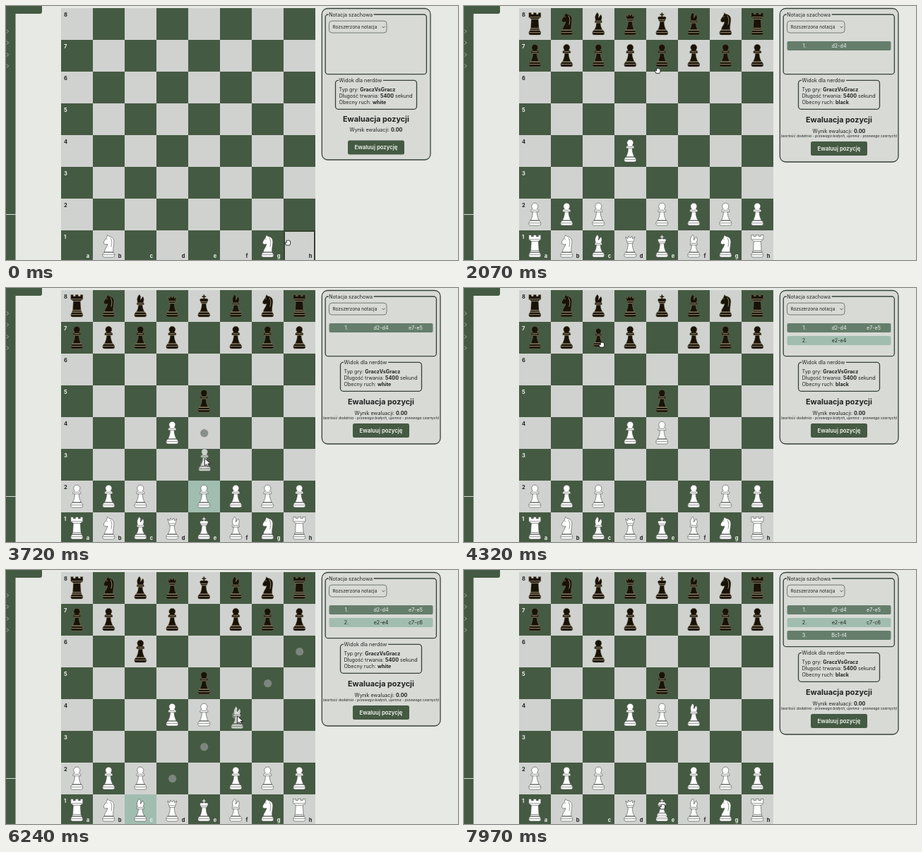
An HTML page for the animation above (7990 ms loop, 640 by 360 pixels).

```html
<!DOCTYPE html>
<html lang="pl">
<head>
<meta charset="utf-8">
<title>Szachy</title>
<style>
  html, body { margin: 0; width: 100%; height: 100%; overflow: hidden; background: #e7e9e5; }
  svg { display: block; width: 100%; height: 100%; }
  text { font: 7.15px Inter, sans-serif; fill: #1f2420; white-space: pre; }
  .bold { font-weight: 700; }
  .mid { text-anchor: middle; }
  .small { font-size: 6.4px; }
  .title { font-size: 10.8px; }
  .note { font-size: 5px; font-style: italic; }
  .button { font-size: 7.8px; font-weight: 600; fill: #f4f6f3; }
  .light { fill: #f0f3ef; }
  .coord { font-size: 7.5px; font-weight: 700; }
  .frame { fill: none; stroke: #36433a; stroke-width: 1.3; }
  .white { fill: #fff; stroke: #454b46; stroke-width: .6; }
  .black { fill: #191207; stroke: #8e8063; stroke-width: .4; }
  .detail { fill: none; }
  .black .detail { stroke: #cbbf9f; stroke-width: .7; }
  .cursor { fill: #fff; stroke: #1a1a1a; stroke-width: .9; stroke-linejoin: round; }
</style>
</head>
<body>
<svg viewBox="0 0 640 360">
  <g id="page"></g>
  <g id="scene"></g>
</svg>
<script>
const LOOP = 7990, LOADED = 100, CELL = 45, LEFT = 78, TOP = 3;
const GREEN = '#455a42', PALE = '#d0d2cf', TEAL = '#a1bdb0', PANEL = '#d8dad6';
const FILES = 'abcdefgh';

// each piece: silhouette above the shared base, then inner lines
const BASE = 'M16 31h13l2 3v1.5q0 2.5-2.5 2.5h-12q-2.5 0-2.5-2.5v-1.5z';
const BASE_LINES = 'M16 31.2h13M14.500 34.600h16';
const SHAPES = {
  p: ['M19.5 14.3a4.6 4.6 0 1 1 6 0l2.5 2v2.4h-2.6c0 4.5.8 7.5 3.1 12.3h-12c2.3-4.8 3.1-7.8 3.1-12.3H17v-2.4z',
      'M18.5 16.4h8M19.5 18.8h6'],
  r: ['M14 6.5h3.5v2.3h3V6.5h4v2.3h3V6.5H31V13l-3.500 2.500.8 13 1.200 2.500h-14l1.200-2.500.8-13L14 13z',
      'M15 12.800h15M17.500 15.600h10M17 28.500h11'],
  n: ['M21 6.5l2 2c5 .5 7.5 4 7 9-.3 4-1.5 8-1 13.5H16.5c0-4.500 4-7 4.500-11.500l-3 .5-2.500-1.500.5-3 3.500-5z',
      'M19.500 12.300h1.500M25 10.500c2.500 4 2.500 8 1 13'],
  b: ['M21 6c-3 3.5-4 7-2.5 11l-1 1.5v2.2h2c0 4-.8 7-3 10.3h12c-2.2-3.3-3-6.3-3-10.3h2v-2.2l-1-1.5c1.5-3 1-6-.5-8l-3.5 5 .5-5z',
      'M18.500 18.400h8M19 20.800h7'],
  q: ['M16 9l3 3 1-4 2.5 3 2.5-3 1 4 3-3-2.5 9h-1c0 5 .8 9 3 13h-12c2.2-4 3-8 3-13h-1z',
      'M18.500 15.800h8M19.500 18.600h6'],
  k: ['M21.7 6.5h1.6v2h2v1.6h-2v2H27l1.5 1.5-2 5h-1c0 5 .8 9 3 12.4h-12c2.2-3.4 3-7.4 3-12.4h-1l-2-5 1.5-1.5h3.7v-2h-2V8.5h2z',
      'M18.500 16.400h8M19.500 18.800h6'],
};

// press: piece shrinks; drag: targets shown; drop: piece lands
const MOVES = [
  { from: 'd2', to: 'd4', dots: 'd3 d4', press: 850, drag: 920, drop: 1460, ghost: false },
  { from: 'e7', to: 'e5', dots: 'e6 e5', press: 2250, drag: 2350, drop: 2960, ghost: true },
  { from: 'e2', to: 'e4', dots: 'e3 e4', press: 3400, drag: 3480, drop: 3960, ghost: true },
  { from: 'c7', to: 'c6', dots: 'c6 c5', press: 4290, drag: 4400, drop: 4920, ghost: true },
  { from: 'c1', to: 'f4', dots: 'd2 e3 f4 g5 h6', press: 5490, drag: 5610, drop: 6500, ghost: true, name: 'B' },
];
const POINTER = [
  [0, 399, 335], [200, 399, 335], [800, 237, 298], [920, 237, 296], [1180, 231.5, 235],
  [1420, 235, 205], [1600, 235, 205], [2220, 281, 72], [2350, 281, 72], [2900, 280, 163],
  [3030, 280, 163], [3380, 282, 297], [3480, 282, 297], [3900, 281, 206], [4020, 281, 206],
  [4280, 195, 80], [4400, 195, 80], [4860, 191, 117], [5000, 191, 117], [5450, 190, 333],
  [5600, 190, 333], [6240, 327.5, 207], [6420, 327, 206], [6850, 327, 206], [7900, 281, 335], [LOOP, 281, 335],
];

const rect = (x, y, w, h, attrs) => `<rect x="${x}" y="${y}" width="${w}" height="${h}" ${attrs}/>`;
const label = (x, y, text, cls = '') => `<text x="${x}" y="${y}" class="${cls}">${text}</text>`;
const bold = text => `<tspan class="bold">${text}</tspan>`;
const place = square => [LEFT + FILES.indexOf(square[0]) * CELL, TOP + (8 - square[1]) * CELL];

function piece([color, kind], x, y, scale = 1, opacity = 1) {
  const [body, lines] = SHAPES[kind];
  const cls = color === 'w' ? 'white' : 'black';
  return `<g class="${cls}" opacity="${opacity}" transform="translate(${x + 22.3} ${y + 22.5}) scale(${scale}) translate(-22.5 -22.5)">
    <path d="${body}"/><path d="${BASE}"/><path class="detail" d="${lines}${BASE_LINES}"/></g>`;
}

function drawPage() {
  let out = rect(0, 0, 13.5, 360, `fill="${GREEN}"`) +
    `<path d="M0 0H51V8q0 3-3 3H0z" fill="${GREEN}"/>` +
    rect(0, 295, 14, 1, 'fill="#d8ddd6"');
  for (const y of [36, 52, 69, 85])
    out += `<path d="M1 ${y - 2.5}l2.5 2.5-2.5 2.5" fill="none" stroke="#c5cec3" stroke-width=".8"/>`;
  for (let row = 0; row < 8; row++)
    for (let col = 0; col < 8; col++)
      out += rect(LEFT + col * CELL, TOP + row * CELL, CELL, CELL,
        `fill="${(row + col) % 2 ? GREEN : PALE}" shape-rendering="crispEdges"`);
  return out;
}

function drawCoords() {
  let out = '';
  for (let i = 0; i < 8; i++) {
    out += label(82, 14.7 + i * CELL, 8 - i, 'coord ' + (i % 2 ? 'light' : ''));
    out += label(LEFT + i * CELL + 38, 357.3, FILES[i], 'mid coord ' + (i % 2 ? '' : 'light'));
  }
  return out;
}

function startBoard(loaded) {
  const board = {};
  [...FILES].forEach((file, i) => {
    const kind = 'rnbqkbnr'[i];
    if (loaded || kind === 'n') board[file + 1] = 'w' + kind;
    if (!loaded) return;
    board[file + 2] = 'wp';
    board[file + 7] = 'bp';
    board[file + 8] = 'b' + kind;
  });
  return board;
}

function pointerAt(t) {
  const i = Math.max(1, POINTER.findIndex(p => p[0] > t));
  const [t0, x0, y0] = POINTER[i - 1], [t1, x1, y1] = POINTER[i];
  const u = (t - t0) / (t1 - t0), e = u * u * (3 - 2 * u);
  return [x0 + (x1 - x0) * e, y0 + (y1 - y0) * e];
}

function drawBoard(t) {
  const board = startBoard(t >= LOADED);
  const [px, py] = pointerAt(t);
  let under = '', pieces = '', over = '', active = null, dragging = false;
  for (const move of MOVES) {
    if (t >= move.drop) {
      board[move.to] = board[move.from];
      delete board[move.from];
    } else if (t >= move.press) {
      active = move;
      dragging = t >= move.drag;
    }
  }
  const snap = (value, origin) => origin + Math.floor((value - origin) / CELL) * CELL;
  const hx = snap(px, LEFT), hy = snap(py, TOP);
  const landed = MOVES.some(m => t >= m.drop && t < m.drop + 90);
  if (dragging) {
    const [x, y] = place(active.from);
    if (!active.ghost)
      under += rect(hx + 1, hy + 1, 43, 43, 'fill="none" stroke="#b3c5ba" stroke-width="2"');
    under += rect(x, y, CELL, CELL, `fill="${TEAL}"`);
    for (const square of active.dots.split(' ')) {
      const [dx, dy] = place(square);
      over += `<circle cx="${dx + 22.7}" cy="${dy + 22.7}" r="5.6" fill="#828a83" fill-opacity=".92"/>`;
    }
    if (active.ghost) over += piece(board[active.from], px - 22.5, py - 20, 1, .7);
  } else if (landed || t < 250) {
    under += rect(hx + 1, hy + 1, 43, 43, 'fill="none" stroke="#34432f" stroke-width="2"');
  }
  for (const square in board) {
    const pressed = active && !dragging && active.from === square;
    pieces += piece(board[square], ...place(square), pressed ? .82 : 1);
  }
  if (t >= 7900) pieces += piece('wk', 258, 315, .82);
  const cursor = dragging
    ? 'M0 0v10.5l2.6-2.2 1.6 3 1.8-.9-1.5-2.900h3.800z'
    : 'M-2.5 4l-1.5-3.5 1.2-.7 1 1v-3.300q.8-.8 1.4 0 .7-1 1.4 0 .8-.6 1.4.3 1-.3 1.2.7V2l-1 2z';
  return under + pieces + drawCoords() + over +
    `<path class="cursor" transform="translate(${px} ${py})" d="${cursor}"/>`;
}

function fieldset(x, y, w, h, title, titleWidth) {
  return rect(x, y, w, h, 'rx="4" class="frame"') +
    rect(x + 4.5, y - 2, titleWidth + 1, 4, `fill="${PANEL}"`) + label(x + 5, y + 2.8, title);
}

function drawPanel(t) {
  const wide = t >= LOADED;
  const done = MOVES.filter(m => t >= m.drop);
  const grow = done.length > 4 ? 12 : 0;
  const width = wide ? 168 : 154, center = 447 + width / 2, low = wide ? 1.5 : 0;
  const infoX = center - 58, infoY = 105 + grow;
  let out = rect(447.3, 3.5, width - .3, (wide ? 217.5 : 214.5) + grow, `rx="8" class="frame" style="fill:${PANEL}"`) +
    fieldset(452.2, 12, width - 10.8, 84.7 + grow, 'Notacja szachowa', 63) +
    rect(457.5, 21.2, 81.5, 16.8, `rx="4" fill="${PANEL}" stroke="#59645c" stroke-width=".8"`) +
    label(462.5, 32, 'Rozszerzona notacja', 'small') +
    '<path d="M532.5 28.8l2 2 2-2" fill="none" stroke="#333" stroke-width=".8"/>';
  for (let i = 0; i < done.length; i += 2) {
    const y = 50 + i * 9, dark = i % 4 === 0, cls = dark ? 'mid light' : 'mid';
    out += rect(457.5, y, 147, 13, `rx="2" fill="${dark ? '#657e6c' : TEAL}"`) +
      label(482, y + 9.1, `${i / 2 + 1}.`, cls);
    done.slice(i, i + 2).forEach((m, j) => {
      out += label(531 + j * 49, y + 9.1, `${m.name || ''}${m.from}-${m.to}`, cls);
    });
  }
  out += fieldset(infoX + .5, infoY + .3, 115, 41, 'Widok dla nerdów', 62) +
    label(infoX + 5.5, infoY + 16.3, 'Typ gry: ' + bold('GraczVsGracz')) +
    label(infoX + 5.5, infoY + 25.3, `Długość trwania: ${bold('5400')} sekund`) +
    label(infoX + 5.5, infoY + 34.3, 'Obecny ruch: ' + bold(done.length % 2 ? 'black' : 'white')) +
    label(center, 163.5 + low + grow, 'Ewaluacja pozycji', 'mid bold title') +
    label(center, 178 + low + grow, 'Wynik ewaluacji: ' + bold('0.00'), 'mid');
  if (wide) out += label(center, 186.3 + grow, '(wartość dodatnia - przewaga białych, ujemna - przewaga czarnych)', 'mid note');
  const buttonY = 190.5 + low + grow;
  return out + rect(center - 40, buttonY, 80, 20, `rx="2.5" fill="${GREEN}"`) +
    label(center, buttonY + 12.9, 'Ewaluuj pozycję', 'mid button');
}

const scene = document.getElementById('scene');
document.getElementById('page').innerHTML = drawPage();

function render(now) {
  scene.innerHTML = drawBoard(now % LOOP) + drawPanel(now % LOOP);
  requestAnimationFrame(render);
}
render(0);
</script>
</body>
</html>
```
